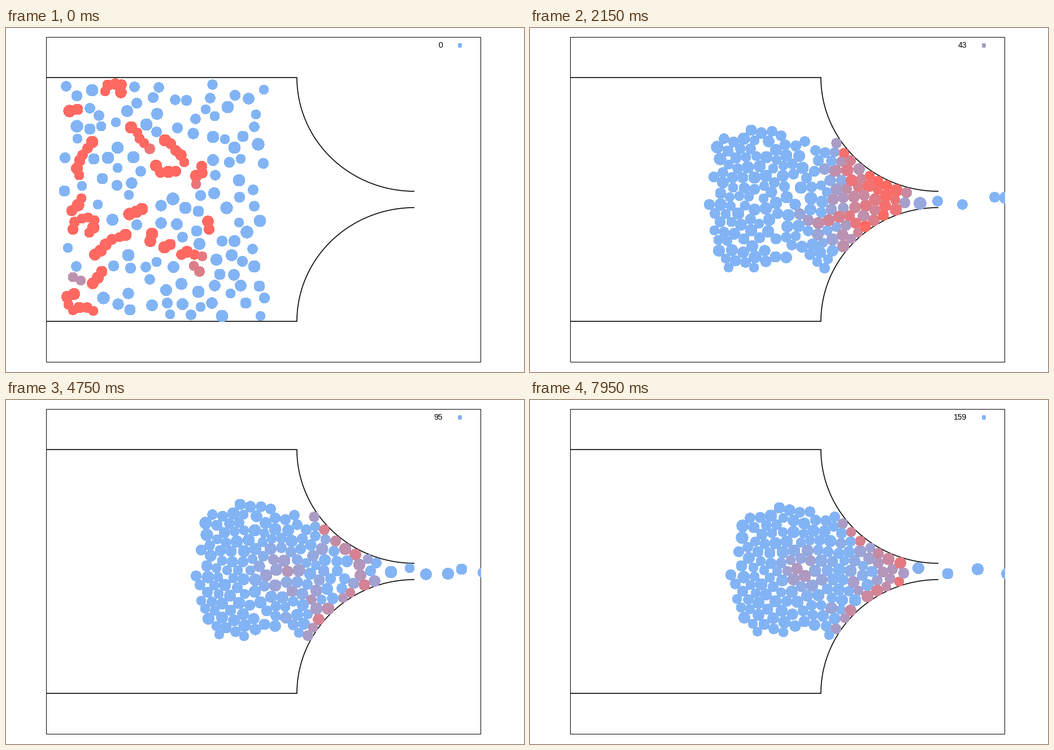
A matplotlib script for the animation above (8 s loop, 917 px wide and 611 px high).

```python
import numpy as np
import matplotlib.pyplot as plt
from matplotlib.animation import FuncAnimation
from matplotlib.collections import EllipseCollection
from matplotlib.patches import Circle, Rectangle

W, H, DPI = 917, 611, 64
PX = 72 / DPI
FRAMES, INTERVAL = 160, 50
COUNT, CLUSTERED, SUBSTEPS, PASSES = 192, 74, 4, 6
TOP, BOTTOM, NECK, AXIS = 88, 521, 723, 305
RX, RY = 208, 202
GATE, EXIT_SPEED = 666, 10.5
CENTRE = np.array([490, 302])
BLUE = np.array([130, 180, 245]) / 255
RED = np.array([255, 105, 97]) / 255

# moments at which the foremost walker leaves: two early runners,
# a steady stream, then a slower one after the exit has been blocked
EXITS = np.r_[0, 2, 21, 24.5, np.arange(35, 103, 3.1), np.arange(128, 160, 5)]


def fits(pts, r, pos, rad):
    """True if the points lie in the starting area, clear of all walkers."""
    x, y = pts.T
    if x.min() < 103 or x.max() > 457 or y.min() < 98 or y.max() > 511:
        return False
    gap = np.hypot(*(pts[:, None] - pos[None]).transpose(2, 0, 1))
    return bool(np.all(gap > r[:, None] + rad[None] + 2))


def start_crowd(rng):
    """Squeezed chains of walkers, mostly at the back, and loose ones."""
    pos, rad = np.empty((0, 2)), np.empty(0)
    for _ in range(20000):
        if len(pos) >= COUNT:
            break
        chain = len(pos) < CLUSTERED
        n = rng.integers(2, 8) if chain else 1
        turn = rng.uniform(0, 2 * np.pi) + np.cumsum(rng.normal(0, 0.7, n))
        walk = rng.uniform(11, 15, n)[:, None] * np.c_[np.cos(turn), np.sin(turn)]
        first = rng.uniform([105, 98], [350 if chain else 457, 511])
        pts = first + np.cumsum(walk, axis=0)
        r = rng.uniform(7.9, 10.7, n)
        if fits(pts, r, pos, rad):
            pos, rad = np.vstack([pos, pts]), np.append(rad, r)
    return pos, rad


def push_from_walls(pos, rad):
    """Keep walkers inside the hall; tell which ones touch the funnel."""
    touch = np.zeros(len(pos), bool)
    pos[:, 1] = np.clip(pos[:, 1], TOP + 1 + rad, BOTTOM - 1 - rad)
    for cy in (TOP, BOTTOM):
        d = pos - (NECK, cy)
        k = np.hypot(d[:, 0] / (RX + rad), d[:, 1] / (RY + rad))
        hit = (k < 1) & (d[:, 0] < 0)
        pos[hit] = (NECK, cy) + d[hit] / k[hit, None]
        touch |= hit
    return touch


def contacts(pos, i, j, reach):
    d = pos[j] - pos[i]
    dist = np.hypot(d[:, 0], d[:, 1]) + 1e-6
    return d / dist[:, None], np.maximum(reach - dist, 0)


def scatter(idx, val, n):
    return np.bincount(idx, weights=val, minlength=n)


def unit(v):
    return v / (np.hypot(*v.T)[:, None] + 1e-6)


def wanted_step(pos, pace, t):
    """Walk to the exit while the crowd gathers into a round heap."""
    x = pos[:, 0]
    drive = np.interp(t, [0, 26, 34, 42, 160], [1, 1, 0.3, 0.07, 0.06])
    suck = np.interp(t, [18, 28], [0, 1.5]) * np.clip((x - 560) / 60, 0, 1)
    speed = (pace + 2 * np.clip((x - 300) / 150, 0, 1)) * drive + suck
    step = unit((735, AXIS) - pos) * speed[:, None]

    shrink = np.interp(t, [43, 160], [1, 0.89])
    rho = np.hypot(*((pos - CENTRE) / (165 * shrink, 143 * shrink)).T)
    pull = 3.5 * np.clip(rho - 1, 0, None) * (x < 530)
    return step + unit(CENTRE - pos) * pull[:, None]


def simulate():
    rng = np.random.default_rng(11)
    pos, rad = start_crowd(rng)
    n = len(pos)
    pace = rng.uniform(4.5, 5.7, n)
    drift = rng.uniform(-0.9, 0.9, n)
    stress = rng.uniform(0, 1, n)
    free = np.zeros(n, bool)
    all_i, all_j = np.triu_indices(n, 1)
    all_reach = rad[all_i] + rad[all_j]

    def load(i, j, overlap):
        return scatter(i, overlap, n) + scatter(j, overlap, n)

    _, overlap = contacts(pos, all_i, all_j, all_reach)
    heat = np.clip((load(all_i, all_j, overlap) - 0.6) / 3, 0, 1)
    states = [(pos.copy(), heat)]

    for t in range(1, FRAMES):
        while free.sum() < np.searchsorted(EXITS, t, side="right"):
            free[np.argmax(np.where(free, -1, pos[:, 0]))] = True

        for _ in range(SUBSTEPS):
            step = wanted_step(pos, pace, t)
            vy = np.where(pos[:, 0] < NECK, (AXIS - pos[:, 1]) * 0.12, drift)
            step[free] = np.c_[np.full(n, EXIT_SPEED), vy][free]
            pos += step / SUBSTEPS

            d = pos[all_j] - pos[all_i]
            near = (d ** 2).sum(1) < (all_reach + 3) ** 2
            i, j, reach = all_i[near], all_j[near], all_reach[near]
            touch = np.zeros(n, bool)
            for k in range(PASSES):
                normal, overlap = contacts(pos, i, j, reach)
                if k == 0:
                    press = load(i, j, overlap)
                move = normal * (0.25 * overlap)[:, None]
                for a in (0, 1):
                    pos[:, a] += scatter(j, move[:, a], n) - scatter(i, move[:, a], n)
                touch |= push_from_walls(pos, rad)
                pos[~free, 0] = np.minimum(pos[~free, 0], GATE)

        # the most squeezed share of the crowd glows, less and less of it
        rank = press.argsort().argsort() / n
        calm = np.interp(t, [27, 43, 75], [0.45, 0.72, 0.87])
        glow = np.clip((rank - calm) / 0.3, 0, 1) * np.clip(press / 0.5, 0, 1)
        glow += touch * (0.2 + 0.5 * stress) * np.interp(t, [25, 40], [0, 1])
        core = np.exp(-((pos - (482, 300)) ** 2).sum(1) / 900)
        glow += core * (0.2 + 0.35 * stress) * np.interp(t, [45, 75], [0, 1])
        glow[free & (pos[:, 0] > 670)] = 0
        heat = 0.4 * heat + 0.6 * np.clip(glow, 0, 1)
        states.append((pos.copy(), heat))
    return rad, states


def blend(heat):
    return BLUE + (RED - BLUE) * np.asarray(heat)[..., None]


radii, states = simulate()

fig = plt.figure(figsize=(W / DPI, H / DPI), dpi=DPI, facecolor="white")
ax = fig.add_axes([0, 0, 1, 1])
ax.set_xlim(0, W)
ax.set_ylim(H, 0)
ax.axis("off")

frame = Rectangle((71.5, 16.5), 769, 577, fill=False, ec="black", lw=PX,
                  snap=False)
ax.add_patch(frame)

angle = np.linspace(0, np.pi / 2, 80)
for cy, side in ((TOP, 1), (BOTTOM, -1)):
    x = np.r_[71, NECK - RX * np.cos(angle)]
    y = np.r_[cy, cy + side * RY * np.sin(angle)]
    ax.plot(x, y, color="black", lw=1.6 * PX, solid_capstyle="butt", zorder=2)

crowd = EllipseCollection(2 * radii, 2 * radii, np.zeros(len(radii)),
                          units="xy", offsets=states[0][0],
                          offset_transform=ax.transData, linewidths=0,
                          edgecolors="none", antialiaseds=False, zorder=3)
ax.add_collection(crowd, autolim=False)
crowd.set_clip_path(Rectangle((71, 16), 770, 578, transform=ax.transData))

lamp = Circle((803.5, 31), 3.5, lw=0, antialiased=False, zorder=4)
ax.add_patch(lamp)
label = ax.text(773, 35, "0", ha="right", va="baseline", color="black",
                family="Liberation Sans", fontsize=14 * PX, zorder=4)


def draw(t):
    pos, heat = states[t]
    crowd.set_offsets(np.round(pos) + 0.5)
    crowd.set_facecolor(blend(heat))
    level = np.interp(t, [17, 22, 32, 43, 75, 115], [0, 1, 1, 0.3, 0.1, 0])
    lamp.set_facecolor(blend(level))
    label.set_text(str(t))
    return crowd, lamp, label


anim = FuncAnimation(fig, draw, frames=FRAMES, interval=INTERVAL,
                     repeat=True, repeat_delay=0, blit=False)
plt.show()
```
